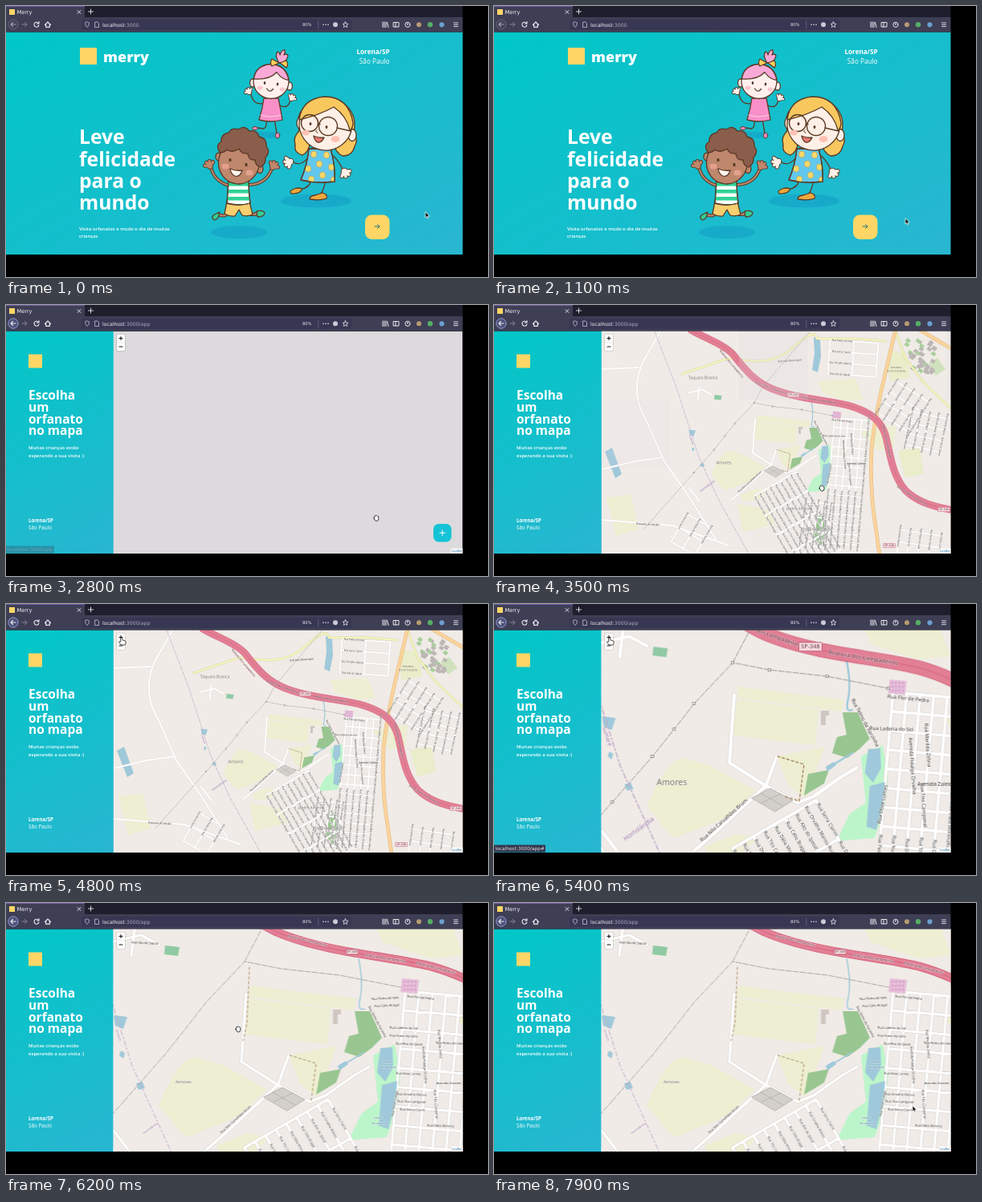
Recreate the animation shown at these times as an HTML page with a canvas. Size 600x338 px, loop 8000 ms.

```html
<!DOCTYPE html>
<html lang="pt-BR">
<head>
<meta charset="utf-8">
<title>Merry</title>
<style>
html, body { margin: 0; width: 100%; height: 100%; overflow: hidden; background: #000; }
canvas { display: block; width: 600px; height: 338px; }
</style>
</head>
<body>
<canvas id="stage" width="600" height="338"></canvas>
<script>
const LOOP = 8000, STEP = 100;
const ctx = document.getElementById('stage').getContext('2d');
const MAP = { x: 133.5, y: 32.5, w: 435, h: 277.5, cx: 351, cy: 171 };
const SANS = '"Open Sans", "Noto Sans", sans-serif';
const UI = '"DejaVu Sans", sans-serif';
const INK = '#5a3a26';

const clamp = v => Math.max(0, Math.min(1, v));
const ramp = (t, a, b) => clamp((t - a) / (b - a));
const mix = (a, b, k) => a + (b - a) * k;
const rgb = (a, b, k) => `rgb(${a.map((v, i) => Math.round(mix(v, b[i], k)))})`;
function seeded(s) {
  return () => (s = (s * 16807) % 2147483647) / 2147483647;
}

// ---- drawing helpers ----
function text(s, x, y, size, weight = 400, color = '#fff', align = 'left', family = SANS) {
  ctx.font = `${weight} ${size}px ${family}`;
  ctx.textAlign = align;
  ctx.fillStyle = color;
  ctx.fillText(s, x, y);
}
function rect(x, y, w, h, color, r = 0) {
  ctx.fillStyle = color;
  ctx.beginPath();
  ctx.roundRect(x, y, w, h, r);
  ctx.fill();
}
function shape(d, fill, stroke = INK, lw = 1.3) {
  const p = new Path2D(d);
  ctx.lineWidth = lw;
  ctx.lineCap = ctx.lineJoin = 'round';
  if (fill) { ctx.fillStyle = fill; ctx.fill(p); }
  if (stroke) { ctx.strokeStyle = stroke; ctx.stroke(p); }
}
const line = (d, color = INK, lw = 1.3) => shape(d, null, color, lw);
function oval(x, y, rx, ry, fill, stroke, lw = 1.3, rot = 0) {
  ctx.beginPath();
  ctx.ellipse(x, y, rx, ry, rot, 0, 7);
  if (fill) { ctx.fillStyle = fill; ctx.fill(); }
  if (stroke) { ctx.strokeStyle = stroke; ctx.lineWidth = lw; ctx.stroke(); }
}
function hand(x, y, angle, skin, size = 6) {
  let d = '';
  for (const k of [-1, -.35, .3, 1]) {
    const a = angle + k;
    d += `M${x} ${y}L${x + Math.cos(a) * size} ${y + Math.sin(a) * size}`;
  }
  line(d, INK, size * .6 + 1.2);
  oval(x, y, size * .55, size * .55, skin, INK, 1);
  line(d, skin, size * .6 - .6);
}

// ---- browser window ----
function chrome(inApp) {
  rect(0, 0, 568.5, 14, '#1e1e2d');
  rect(0, 0, 98, 14, '#3e3e55');
  rect(0, 0, 98, 1, '#6f5ba8');
  rect(0, 14, 568.5, 18.5, '#3e3e55');
  rect(94, 17, 336, 13, '#373753', 2);
  rect(4, 4, 7, 7, '#ffd666');
  text('Merry', 13.5, 10, 6.6, 400, '#f2f2f6', 'left', UI);
  const c = '#e8e8f0';
  line('M89 5.5l4 4m0-4l-4 4M102.500 7h6m-3-3v6', c, .9);
  oval(9, 23, 6.2, 6.2, inApp ? '#50547c' : '#444459', inApp ? '#98a4dc' : '#65657d', .9);
  line('M12 23h-6m2.500-2.500l-2.500 2.500l2.500 2.500', inApp ? c : '#a0a0b2', 1.1);
  line('M20 23h6m-2.500-2.500l2.500 2.500l-2.500 2.500', '#85859a', 1);
  line('M40.500 21.500a3 3 0 1 0 .4 2.500M41 19.500v2.500h-2.500', c, 1.1);
  line('M48.500 23.500l3.500-3.500l3.500 3.500M49.700 23v3.300h4.600v-3.300', c, 1.2);
  line('M101 20l2.500 1q0 4-2.500 5.500q-2.500-1.500-2.500-5.500z', '#c5c5d3', .8);
  line('M111 20h3l1.500 1.500v5h-4.500z', '#c5c5d3', .8);
  text('localhost', 120, 25.500, 6.2, 400, '#f4f4f8', 'left', UI);
  const w = ctx.measureText('localhost').width;
  text(':3000' + (inApp ? '/app' : ''), 120 + w, 25.500, 6.2, 400, '#a9a9bd', 'left', UI);
  text('80%', 369, 25.300, 5.2, 400, '#e4e4ee', 'left', UI);
  rect(388.500, 18.500, .7, 10, '#6c6c85');
  for (const x of [395, 398, 401]) oval(x, 23.300, .8, .8, c);
  oval(410, 23.200, 3, 3, '#c9c9d8');
  line('M422.500 19.700l1 2.400l2.500.2l-2 1.700l.7 2.500l-2.200-1.400l-2.200 1.400l.7-2.500l-2-1.700l2.500-.2z', c, .8);
  line('M469 20v6.500M471 20v6.500M473 20v6.500M474.500 20.500l1.500 6', c, 1);
  line('M482.500 20.500h6.500v5.500h-6.500zM485 20.500v5.500', c, 1);
  oval(500, 23.300, 3.1, 3.1, null, c, 1);
  oval(500, 22.500, 1, 1, c);
  oval(514, 23.300, 3, 3, '#b99a72');
  oval(528, 23.300, 3.2, 3.2, '#55ad63');
  oval(542.500, 23.300, 3.1, 3.1, '#6c9fd0');
  line('M557.500 21h5M557.500 23.300h5M557.500 25.600h5', c, .9);
}
function gradient(w, x0, y0, x1, y1) {
  const g = ctx.createLinearGradient(x0, y0, x1, y1);
  g.addColorStop(0, '#29b6d1');
  g.addColorStop(1, '#00c7c7');
  rect(0, MAP.y, w, MAP.h, g);
}

// ---- landing page ----
function smallGirl() {
  const skin = '#fff0ee', pink = '#f88fc8', hair = '#f9a9d6';
  line('M324 142q1 9-3 11l-8-1M334 142q2 9 3 17');
  oval(310, 152.500, 3.5, 2, pink, INK, 1);
  oval(338, 161.500, 2.500, 3.5, pink, INK, 1);
  line('M322 121q-14 4-17-11M338 122q12 9 16-4');
  hand(303, 108, -2.1, skin, 5);
  hand(355, 116, -1, skin, 5);
  shape('M321 115h18q3 14 5 27q-14 4-29 0q4-13 6-27z', pink);
  line('M317 136q13 4 25 0', '#ffd0ea', 1.2);
  shape('M340 71q-6-9-2-14q3 1 3 4q2-7 6-6q1 4-1 6q4-2 5 1q-1 6-8 9z', hair);
  oval(307, 96, 3.4, 5, skin, INK);
  oval(353, 100, 3.4, 5, skin, INK);
  oval(330, 94, 22, 21.500, skin, INK);
  shape('M308.500 91q2-17 21-18.500q19 1 22.500 20q-9-1-15-10q-9 10-28.500 8.500z', hair);
  shape('M340 71l-9-5q-3 5 0 9zM341 71l8-3q3 5 0 9z', '#ffd05c');
  oval(322, 96, 1.3, 1.9, INK);
  oval(338, 97.500, 1.3, 1.9, INK);
  oval(316, 102, 3.5, 2.500, '#ffc3cc');
  oval(344, 104, 3.5, 2.500, '#ffc3cc');
  line('M324.500 103q4 6 8 .5');
}
function blondGirl() {
  const skin = '#fff0e7', hair = '#f8c85f';
  line('M380 217q-2 10-14 12M397 218q0 10-6 17');
  shape('M369 228q-3 7-14 6q-3-4 4-6q5-2 10 0z', '#f2a83c');
  shape('M394 233q7 2 5 7q-8 3-21 1q0-4 7-5z', '#f2a83c');
  shape('M377 123q-18 9-12 33q-8 7-5 17q-2 10 9 13q8-4 9-15zM418 120q20 13 15 38q6 9 1 17q-3 12-15 12q-10-5-10-15z', hair);
  line('M378 186q-10 16-22 8M405 185q10 8 14 19');
  hand(354, 194, 2.8, skin, 7);
  hand(421, 206, 1, skin, 7);
  const dress = 'M377 178h27q6 19 5 41q-22 3-42-2q8-19 10-39z';
  shape(dress, '#62c8ee');
  ctx.save();
  ctx.clip(new Path2D(dress));
  for (const [x, y] of [[383, 185], [399, 186], [390, 197], [405, 201], [376, 203], [394, 211], [380, 216], [408, 217]])
    oval(x, y, 3.6, 3.9, '#f7d96c', '#c79b3e', .6);
  ctx.restore();
  line(dress);
  oval(366, 146, 4, 7, skin, INK);
  oval(431, 161, 5, 7.500, skin, INK);
  oval(398, 147, 33, 33, skin, INK, 1.3, .15);
  shape('M365 142q3-26 31-29q31 0 36 33q-1 8-4 9q-4-18-20-29q-18 10-43 16z', hair);
  oval(378, 146, 10.500, 10.500, null, INK, 1.4);
  oval(401, 150, 11.500, 11.500, null, INK, 1.4);
  line('M388.500 147.500q1-2 2.500 0M412 152l17 4', INK, 1.3);
  oval(379, 147, 1.4, 2.1, INK);
  oval(399, 151, 1.4, 2.1, INK);
  oval(373, 158, 5, 3.5, '#ffc1b5');
  oval(410, 166, 5.5, 4, '#ffc1b5');
  line('M387 155q-3 2 1 3', INK, 1);
  shape('M383 162q7 3 13 2q-3 7-8 6q-4-2-5-8z', '#e8776c');
}
function boy() {
  const skin = '#bf876c', hair = '#8b5d4b', green = '#2fd296';
  line('M277 257q-4 7-13 3M300 256q4 7 14 2', INK, 4.2);
  line('M277 257q-4 7-13 3M300 256q4 7 14 2', skin, 2);
  shape('M266 257q-1 8-6 10q-5-2-2-6z', green);
  shape('M312 256q8-2 10 2q0 5-9 5z', green);
  line('M277 224q-17-6-21-20M303 223q20-1 27-18', INK, 4.2);
  line('M277 224q-17-6-21-20M303 223q20-1 27-18', skin, 2);
  hand(254, 200, -2, skin, 6.500);
  hand(332, 201, -1, skin, 6.500);
  shape('M275 244h28l4 16q-7 3-13 1l-4-7l-5 8q-7 1-13-3z', '#f7cf70');
  const shirt = 'M277 218h25q0 14 2 28q-14 4-29 0z';
  shape(shirt, '#f7fff9');
  ctx.save();
  ctx.clip(new Path2D(shirt));
  for (let y = 220; y < 250; y += 9) rect(270, y, 40, 4.5, green);
  ctx.restore();
  line(shirt);
  oval(265, 188, 4, 5, skin, INK);
  oval(316, 203, 4, 5.5, skin, INK);
  oval(290, 195, 25.500, 27, skin, INK, 1.3, .2);
  shape('M266 182q-6-8 2-13q-1-9 9-11q4-7 12-4q8-6 14 2q10-2 12 7q10 2 9 12q6 7-1 14q1 8-6 12q-7-2-7-9q-8 1-9-8q-8 1-11-6q-9 6-15 1q-4 5-9 3z', hair);
  oval(279, 192, 1.6, 2.3, INK);
  oval(299, 198, 1.6, 2.3, INK);
  oval(273, 200, 4.5, 3.5, '#e5a08c');
  oval(303, 208, 4.5, 3.5, '#e5a08c');
  shape('M279 203q7 3 15 2q-3 9-9 7q-5-2-6-9z', '#fff6ef');
}
function landing(t) {
  gradient(568.5, 418, 398, 150, -56);
  rect(92, 52, 21, 21, '#ffd666');
  text('merry', 121, 69.500, 18, 800);
  text('Lorena/SP', 477.500, 60, 8.1, 700, '#fff', 'right');
  text('São Paulo', 477.500, 72.300, 8.2, 400, '#fff', 'right');
  ['Leve', 'felicidade', 'para o', 'mundo'].forEach((s, i) => text(s, 91, 172.300 + i * 27.300, 24.700, 700));
  text('Visite orfanatos e mude o dia de muitas', 91, 280, 5.9, 600);
  text('crianças', 91, 288.500, 5.9, 600);
  const shadow = 'rgba(16,148,196,.45)';
  oval(290, 282, 35, 8, shadow);
  oval(386, 243, 44, 8.500, shadow);
  oval(322, 161, 21, 4, shadow);
  smallGirl();
  blondGirl();
  boy();
  rect(447, 260.500, 30.500, 30.500, rgb([255, 214, 102], [150, 254, 255], ramp(t, 1770, 2000)), 8.500);
  line('M459 275h6m-2.500-2.500l2.500 2.500l-2.500 2.500', '#27707c', 1);
}

// ---- map ----
const near = d => new Path2D(d);
function far(d) {
  const p = new Path2D();
  p.addPath(new Path2D(d), new DOMMatrix([2, 0, 0, 2, -MAP.cx, -MAP.cy]));
  return p;
}
// x, y, degrees, columns, rows, column gap, row gap
const blocks = [
  [297, 305, -30, 9, 5, 15, 56],
  [497, 110, 5, 6, 14, 17, 24],
  [425, 318, 8, 5, 5, 16, 36],
  [480, 0, -86, 4, 3, 28, 60],
  [650, 20, 32, 5, 4, 24, 30],
  [660, 390, 8, 5, 3, 26, 30],
  [690, 95, 12, 5, 4, 22, 28],
  [130, 350, 30, 3, 3, 34, 40]
];
const streetNames = ['Rua Pedra do Vale', 'Rua Célio Bragal', 'Rua Nuno Varzeão', 'Rua Alto do Ipezal', 'Rua Doze Lumes',
  'Rua Orvalho Manso', 'Rua Tito Campanel', 'Rua Serra Clarim', 'Rua Dália Morena'];
function streets() {
  const all = new Path2D();
  for (const [x, y, deg, cols, rows, dx, dy] of blocks) {
    const p = new Path2D();
    for (let c = 0; c < cols; c++) { p.moveTo(c * dx, 0); p.lineTo(c * dx, (rows - 1) * dy); }
    for (let r = 0; r < rows; r++) { p.moveTo(0, r * dy); p.lineTo((cols - 1) * dx, r * dy); }
    all.addPath(p, new DOMMatrix().translate(x, y).rotate(deg));
  }
  return all;
}
function drawMap(g, hi) {
  const size = (lo, high) => hi ? high : lo;
  const fill = (p, c) => { g.fillStyle = c; g.fill(p); };
  const stroke = (p, c, w, dash = []) => {
    g.setLineDash(dash); g.strokeStyle = c; g.lineWidth = w; g.stroke(p); g.setLineDash([]);
  };
  const road = (p, c, edge, w) => { stroke(p, edge, w + 1.2); stroke(p, c, w); };
  const label = (s, x, y, deg, px, c = '#35322f', bold = 400) => {
    g.save();
    g.translate(x, y);
    g.rotate(deg * Math.PI / 180);
    g.font = `${bold} ${px}px "Noto Sans", sans-serif`;
    g.textAlign = 'center';
    g.textBaseline = 'middle';
    g.strokeStyle = 'rgba(255,255,255,.5)';
    g.lineWidth = 1.2;
    g.strokeText(s, 0, 0);
    g.fillStyle = c;
    g.fillText(s, 0, 0);
    g.restore();
  };
  g.lineJoin = g.lineCap = 'round';
  g.fillStyle = '#f0ebe7';
  g.fillRect(-90, -110, 880, 570);

  // fields, woods, park, water
  const field = '#edeed2';
  fill(near('M304 103L436 119L433 134L302 117Z'), field);
  fill(near('M302 119L404 132L400 176L297 164Z'), field);
  fill(near('M352 190L412 178L388 242L366 226Z'), field);
  fill(near('M190 252Q215 192 236 192L270 202L325 233L290 266L226 292Q210 280 202 266Z'), field);
  fill(near('M262 303L300 287L328 292L306 315L268 318Z'), field);
  fill(far('M403 95L450 92L460 118L440 120L410 110ZM455 157L500 150L498 178L478 182ZM303 248L345 256L350 273L310 283ZM140 240L170 236L180 280L152 288Z'), field);
  fill(far('M490 56L512 60L518 90L492 95ZM503 182L530 178L535 210L512 215Z'), '#e9edc9');
  const wood = '#99c690';
  fill(near('M434 135L453 135L468 168L455 181L440 192L421 186L427 166L439 163Z'), wood);
  fill(near('M391 212L417 207L411 224L386 239Z'), wood);
  fill(far('M402 264L411 260L415 288L407 300L399 290Z'), wood);
  fill(far('M541 72L552 66L562 80L550 88Z'), '#cfe2bd');
  fill(near('M457 190L484 176L491 214L487 255L474 292L426 296L443 262L463 248Z'), '#bdf5cb');

  // minor roads
  const edge = '#dad4cf', w = size(4, 3.2);
  road(streets(), '#fff', edge, size(3.6, 3));
  const water = '#9fc9da';
  fill(near('M466 181L481 180L482 205L472 223L462 211Z'), water);
  fill(near('M468 227L487 222L484 251L476 282L464 278Z'), water);
  fill(near('M134 140L151 142L146 157L136 153ZM162 225l8-2l3 8l-8 2ZM143 184l5 3l-2 7l-5-4ZM413 203l10-6l3 4l-11 8Z'), water);
  fill(far('M138 183L147 178L159 211L151 216ZM398 40L406 44L407 64L403 84L396 81L399 60Z'), water);
  stroke(near('M439 70Q445 100 441 118T446 132M423 200L446 186'), water, size(2.400, 1.5));
  fill(near('M198 53l18 2l-2 11l-17-2Z'), '#8fcaa4');
  fill(near('M493 94l21 2l-2 17l-21-2Z'), '#e6bcd9');
  for (let i = 0; i < 12; i++)
    fill(near(`M${495 + i % 4 * 4.500} ${97 + (i >> 2) * 5}h2v2h-2z`), '#d09fc3');
  const rand = seeded(9);
  for (let i = 0; i < 40; i++)
    fill(near(`M${675 + rand() * 75} ${-95 + rand() * 88}l9 6l-5 7l-9-6z`), i % 4 ? '#bdb8b5' : '#a9cf9b');
  fill(near('M407 133h10v6h-4v12h-6Z'), '#cfc6bf');
  road(near('M299 113L293 198L337 226L378 248L398 240L432 216L452 204M337 228L272 288L240 316M352 190L338 228'), '#fff', edge, w);
  road(near('M134 48L168 40L190 52M160 33L156 66M134 284L160 318'), '#fff', edge, w);
  fill(near('M321 242L344 230L372 245L350 259Z'), '#d3d0cc');
  stroke(near('M321 242L344 230L372 245L350 259ZM332 236L360 252M333 248L357 237'), '#b8b4b0', 1);
  road(far('M207 33L186 70Q168 108 190 145L212 195L240 235L276 292M134 268L222 275L292 300M134 80L180 78M134 205L175 195L210 190'), '#fff', edge, w);
  stroke(near(hi ? 'M303 80L300 150L295 172M353 190L386 200L380 246' : 'M353 190L386 200L380 246L362 240'), '#a98a5e', size(1.4, .9), [3, 3]);

  // main roads
  road(far('M234 86L290 67L322 70Q352 72 376 50T402 42H450L487 45M500 33L512 66L535 97L572 132'), '#f5f5bd', '#c3bf8e', size(4.500, 4));
  road(far('M500 30L486 90Q474 140 470 180Q468 225 473 262L480 312M528 30L572 56'), '#fad39c', '#d2a25e', size(8, 7));
  const motorway = far('M245 31C262 41 284 48 297 61C312 80 325 97 350 106C380 117 410 118 440 125C468 133 482 143 488 165C494 190 496 212 512 231C528 247 550 252 572 256');
  road(motorway, '#e27f95', '#cf5672', size(16.500, 9.500));
  stroke(motorway, '#d8647f', 1);

  // power lines and borders
  const pylons = [[147, 247], [197, 190], [224, 156], [249, 124], [297, 73], [343, 82], [415, 90], [491, 105]];
  stroke(near('M' + pylons.join('L') + 'M297 73L318 33L440 -110M147 247L20 390'), '#9c9895', size(1, .8), [7, 2]);
  if (!hi) for (const [x, y] of pylons) {
    g.fillStyle = '#f0ebe7'; g.fillRect(x - 1.5, y - 1.5, 3, 3);
    g.strokeStyle = '#85817d'; g.lineWidth = .8; g.strokeRect(x - 1.5, y - 1.5, 3, 3);
  }
  stroke(far('M200 33L226 100L242 149L254 187L278 240L318 312'), '#c3adc9', size(1.5, 1), [6, 3, 2, 3]);

  // names
  const small = size(6.300, 4.1), purple = '#9670a0';
  for (const [i, [x, y, deg, cols, rows, dx, dy]] of blocks.entries()) {
    if (hi && i > 0) continue;
    const m = new DOMMatrix().translate(x, y).rotate(deg);
    for (let c = 0; c < cols; c++) for (let r = 0; r < rows - 1; r += i ? 2 : 1) {
      const p = m.transformPoint(new DOMPoint(c * dx, (r + .5) * dy));
      if (i !== 1 || p.y > 290 || p.x > 565)
        label(streetNames[(c * 2 + r + i) % 9], p.x, p.y, deg + 90, size(6, 4));
    }
  }
  for (const [s, x, y, deg] of [
    ['Rua Flor de Pedra', 516, 118, 6], ['Rua Ladeira do Sol', 495, 156, 2], ['Avenida Fidalga Orvalha', 521, 202, 86],
    ['Rua Marilda Zelina', 540, 176, 86], ['Avenida Zuleida', 551, 225, 0], ['Rua Telmo da Varzinha', 462, 148, 62],
    ['Rua Nilo Carvalhães Brum', 286, 270, -42], ['Rua Tito Campanel', 535, 251, 86], ['Rua Doze Lumes', 484, 250, -80]
  ]) label(s, x, y, deg, small);
  if (hi) {
    [[472, 119], [474, 128], [495, 166], [502, 176], [501, 213], [505, 239], [505, 248], [506, 258], [541, 278], [552, 175]]
      .forEach(([x, y], i) => label(streetNames[i % 9], x, y, i < 2 ? -3 : 2, 4));
    label('Lagos', 475, 198, 0, 4, '#4d7b98');
    label('do parque', 476, 205, 0, 4, '#4d7b98');
    label('Lagos', 463, 268, 0, 4, '#4d7b98');
    label('do parque', 465, 275, 0, 4, '#4d7b98');
    label('Avenida do Sobral', 173, 50, 3, 4);
  } else {
    label('Taquara Branca', 169, 11, 0, 10, '#77736f');
    label('Jardim Amanda', 455, 389, 0, 10, '#77736f');
    label('Jardim Amanda', 409, 337, 0, 9, '#77736f');
    label('Estrada Municipal', 385, -32, -4, 7);
    label('Estrada de Varjão', 32, 376, 3, 7);
    label('Instituto', 650, -15, 0, 7, '#79634c');
    label('Horto Paulista', 650, -6, 0, 7, '#79634c');
  }
  label('Amores', 221, 223, 0, size(10.500, 5.500), '#77736f');
  label('Sumaré', 140, 165, 72, size(7, 4), purple);
  label('Hortolândia', 180, 281, -36, size(8, 4), purple);
  const spots = hi ? [[375, 47, 14], [472, 69, 9], [535, 81, 14]]
    : [[340, 37, 20], [460, 67, 9], [240, -24, 50], [627, 170, 78], [690, 305, 32]];
  for (const [x, y, deg] of spots)
    label('Rodovia dos Lampadeiros', x, y, deg, size(7.300, 4.2), '#5c2b38');
  for (const [x, y] of [hi ? [431, 61] : [394, 53], [769, 339], [633, 429]]) {
    const tw = size(29, 15), th = size(11, 6);
    g.fillStyle = '#f7d7dc'; g.strokeStyle = '#b85a70'; g.lineWidth = .9;
    g.beginPath(); g.roundRect(x - tw / 2, y - th / 2, tw, th, 1); g.fill(); g.stroke();
    label('SP-348', x, y, 0, size(7.300, 4), '#5c2b38');
  }
}
function bake(scale, hi) {
  const c = document.createElement('canvas');
  c.width = MAP.w * scale;
  c.height = 278 * scale;
  const g = c.getContext('2d');
  g.translate(c.width / 2 - MAP.cx, c.height / 2 - MAP.cy);
  drawMap(g, hi);
  return c;
}
const wide = bake(2, false);
const close = bake(1, true);

// tiles fade in one after another
function tiles(img, zoom, t, start, spread) {
  if (t < start) return;
  const rand = seeded(41), side = 86;
  const w = MAP.w * zoom, h = 278 * zoom;
  const paint = () => ctx.drawImage(img, MAP.cx - w / 2, MAP.cy - h / 2, w, h);
  if (t > start + spread + 200) return paint();
  for (let y = 32; y < 310; y += side) for (let x = 133; x < 569; x += side) {
    const from = start + rand() * spread;
    ctx.save();
    ctx.beginPath();
    ctx.rect(x, y, side, side);
    ctx.clip();
    ctx.globalAlpha = ramp(t, from, from + 200);
    paint();
    ctx.restore();
  }
}

function app(t) {
  gradient(134, 145, 303, -11, 39);
  rect(28, 61.500, 17, 17, '#ffd666');
  ['Escolha', 'um', 'orfanato', 'no mapa'].forEach((s, i) => text(s, 28, 118 + i * 14.800, 15.500, 700));
  text('Muitas crianças estão', 28, 180.300, 6, 600);
  text('esperando a sua visita :)', 28, 190, 6, 600);
  text('Lorena/SP', 28, 271.300, 6.1, 700);
  text('São Paulo', 28, 279.800, 6.3);

  ctx.save();
  ctx.beginPath();
  ctx.rect(MAP.x, MAP.y, MAP.w, MAP.h);
  ctx.clip();
  ctx.fillStyle = '#dddadd';
  ctx.fill();
  rect(532, 273, 22.500, 22.500, '#15c3d6', 6.500);
  line('M543.200 281v6.500M540 284.200h6.500', '#fff', 1);
  const k = ramp(t, 5150, 5450);
  tiles(wide, 1 + (1 - (1 - k) ** 3), t, 2950, 400);
  tiles(close, 1, t, 5700, 150);
  ctx.restore();

  rect(137.500, 36, 11, 21.500, 'rgba(0,0,0,.22)', 1.5);
  rect(138, 36.500, 10, 20.500, '#fff', 1);
  rect(138, 46.700, 10, .5, '#ccc');
  line('M141 41.500h4M143 39.500v4M141 52h4', '#111', 1.1);
  rect(553.500, 303.500, 15, 6.5, 'rgba(255,255,255,.75)');
  text('Leaflet', 555, 308.200, 4, 400, '#2878a8', 'left', '"Liberation Sans", sans-serif');
}

function status(s, w, alpha) {
  ctx.save();
  ctx.globalAlpha = alpha;
  rect(0, 300.500, w, 9, '#35354b', 1);
  text(s, 1.5, 307.200, 5.900, 400, '#e6e6ee', 'left', UI);
  ctx.restore();
}

// ---- pointer ----
const track = [[0, 522, 257], [300, 522, 257], [800, 512, 265], [1100, 512, 265], [1700, 480, 266], [1800, 461, 265],
  [2500, 461, 265], [2700, 461, 266], [3300, 461, 266], [4500, 144, 42], [5700, 144, 42], [6200, 289, 157.500],
  [6500, 345, 178], [7200, 521, 253], [LOOP, 521, 253]];
const cursors = {
  arrow: ['M0 0V7L1.600 5.600L2.700 8L3.900 7.400L2.800 5.200L5 5Z', '#111', '#fff', .7],
  point: ['M-1 .5Q0-.8 1 .5V3L4.500 4Q5.500 4.500 5 7L4 9H-1L-3.500 5.500Q-3.500 4-1.500 5Z', '#fff', '#222', .8],
  grab: ['M-3 0Q-3.500-2-2-2V-3Q-1-4-.3-3Q.6-4 1.300-2.800Q2.800-3 2.800-1V1Q2.500 3.500 0 3.500Q-1.800 3.500-3 0Z', '#fff', '#222', .9]
};
function pointer(t) {
  const i = track.findIndex(p => p[0] > t);
  const [a, b] = [track[i - 1], track[i]];
  const k = ramp(t, a[0], b[0]);
  const kind = t < 1800 ? 'arrow' : t < 2600 ? 'point' : t < 4500 ? 'grab' : t < 5800 ? 'point' : t < 7300 ? 'grab' : 'arrow';
  ctx.save();
  ctx.translate(mix(a[1], b[1], k), mix(a[2], b[2], k));
  shape(...cursors[kind]);
  ctx.restore();
}

function draw(now) {
  const t = Math.floor(now % LOOP / STEP) * STEP;
  ctx.fillStyle = '#000';
  ctx.fillRect(0, 0, 600, 338);
  const inApp = t >= 2500;
  if (inApp) app(t); else landing(t);
  chrome(inApp);
  if (t >= 2000 && t < 2900) status('localhost:3000/app', 60, t < 2800 ? 1 : .3);
  if (t >= 5000 && t < 5900) status('localhost:3000/app#', 64, 1);
  pointer(t);
}
const begin = performance.now();
function tick() {
  draw(performance.now() - begin);
  requestAnimationFrame(tick);
}
tick();
</script>
</body>
</html>
```
